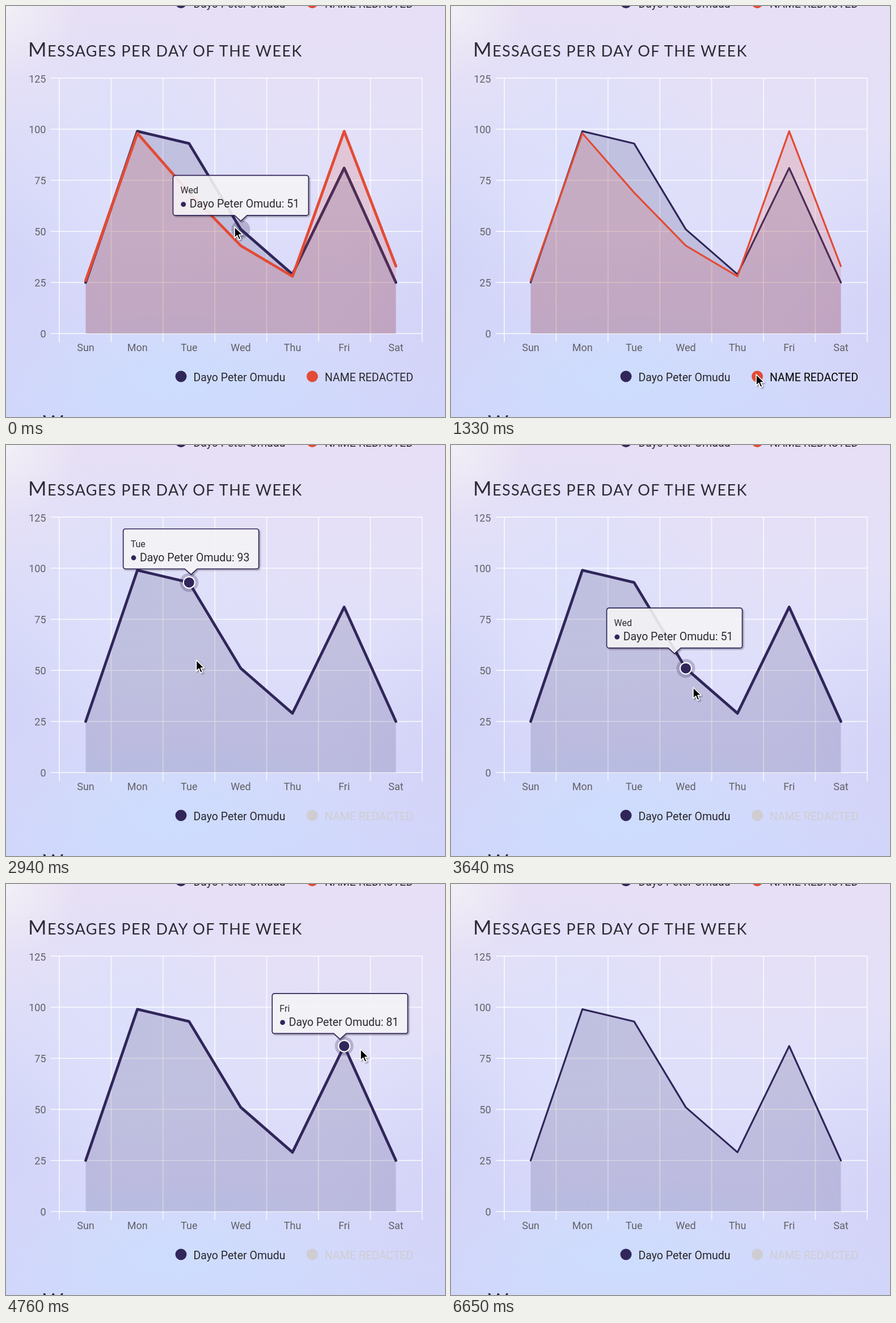
An HTML page that plays this animation: 774 by 724 pixels, repeating every 6720 ms.

```html
<!DOCTYPE html>
<html lang="en">
<head>
<meta charset="utf-8">
<title>Messages per day of the week</title>
<style>
  html, body { margin: 0; width: 100%; height: 100%; overflow: hidden; }
  body {
    background:
      radial-gradient(circle at 0 0, rgba(243,241,246,.9), rgba(243,241,246,0) 130px),
      radial-gradient(ellipse 330px 150px at 300px 660px, rgba(205,221,253,.95), rgba(205,221,253,0)),
      radial-gradient(ellipse 260px 260px at 220px 260px, rgba(218,223,252,.8), rgba(218,223,252,0)),
      radial-gradient(ellipse 210px 330px at 0 470px, rgba(209,211,248,.9), rgba(209,211,248,0)),
      radial-gradient(ellipse 200px 300px at 774px 560px, rgba(211,210,247,.9), rgba(211,210,247,0)),
      linear-gradient(#e7dff5, #e4e0f7 25%, #dfdffa 50%, #d8d9fa 75%, #d0d8fb);
  }
  svg { display: block; width: 774px; height: 724px; font-family: Roboto, Arial, sans-serif; }
  .title { font: 27px Lato, "Open Sans", sans-serif; letter-spacing: 1.4px; fill: #2d2a35; }
  .title .cap { font-size: 35px; }
  .axis { font-size: 18px; fill: #626068; }
  .legend { font-size: 19.5px; fill: #29272f; }
  .grid { stroke: #fff; stroke-opacity: .68; stroke-width: 2; fill: none; }
  .line { fill: none; stroke-linejoin: round; stroke-linecap: round; }
  .tip text { fill: #2b2a31; }
</style>
</head>
<body>
<svg id="stage" viewBox="0 0 774 724">
  <defs>
    <filter id="shadow" x="-10%" y="-20%" width="125%" height="150%">
      <feDropShadow dx="2" dy="2" stdDeviation="1.3" flood-color="#000" flood-opacity=".32"/>
    </filter>
  </defs>
</svg>
<script>
const LOOP = 6720, STEP = 70;
const NAVY = '#30265a', RED = '#e24b35', GREY = '#cfcdd2';
const NAME = 'Dayo Peter Omudu', OTHER = 'NAME REDACTED';
const DAYS = ['Sun', 'Mon', 'Tue', 'Wed', 'Thu', 'Fri', 'Sat'];
const FIRST = [25, 99, 93, 51, 29, 81, 25];
const SECOND = [26, 98, 69, 43, 28, 99, 33];
const CLICK = 1470;

// Pointer: time, x, y
const PATH = [
  [0, 403, 389], [210, 410, 404], [630, 490, 560], [980, 538, 649], [1680, 538, 649],
  [2310, 455, 484], [2680, 368, 410], [3080, 318, 362], [3360, 335, 388],
  [3520, 369, 408], [3640, 427, 427], [3850, 480, 440], [4250, 505, 425],
  [4560, 550, 370], [4760, 625, 291], [5150, 622, 300], [5290, 550, 440],
  [5390, 392, 681], [5460, 352, 750]
];

// Each visit: point hovers (time, day), moment the pointer leaves, moment the tooltip hides
const VISITS = [
  { hovers: [[-1000, 3]], leave: 0, hide: 490 },
  { hovers: [[2380, 3], [2680, 2], [3520, 3], [3750, 4], [4562, 5], [5294, 4]], leave: 5348, hide: 5850 }
];
const FADE = 210;

const stage = document.getElementById('stage');
const px = i => 140.5 + i * 91.15;
const py = v => 577 - v * 3.6;

function add(tag, attrs, parent = stage, text) {
  const el = document.createElementNS('http://www.w3.org/2000/svg', tag);
  set(el, attrs);
  if (text !== undefined) el.textContent = text;
  parent.append(el);
  return el;
}

function set(el, attrs) {
  for (const key in attrs) el.setAttribute(key, attrs[key]);
}

function heading(x, y, cap, rest) {
  const el = add('text', { x, y, class: 'title' });
  add('tspan', { class: 'cap' }, el, cap);
  add('tspan', {}, el, rest);
}

function legend(dy) {
  const item = (x, color, label) => ({
    dot: add('circle', { cx: x, cy: 652.5 + dy, r: 10, fill: color }),
    label: add('text', { x: x + 22, y: 661 + dy, class: 'legend' }, stage, label)
  });
  item(308.5, NAVY, NAME);
  return item(540, RED, OTHER);
}

function series(values, color) {
  const group = add('g', {});
  const points = values.map((v, i) => `${px(i)},${py(v)}`).join(' ');
  add('polygon', { points: `${px(0)},577 ${points} ${px(6)},577`, fill: color, 'fill-opacity': .17 }, group);
  const line = add('polyline', { points, stroke: color, class: 'line' }, group);
  return { group, line };
}

legend(-658.5);
heading(39, 89, 'M', 'ESSAGES PER DAY OF THE WEEK');
heading(65, 746, 'W', 'ORDS');

for (let i = 0; i <= 5; i++) {
  const y = i === 5 ? 127 : Math.round(577 - i * 89.9);
  add('path', { d: `M79 ${y}H734`, class: 'grid' });
  add('text', { x: 70.5, y: y + (i === 5 ? 8 : 7), class: 'axis', 'text-anchor': 'end' }, stage, i * 25);
}
for (let i = 0; i <= 7; i++) add('path', { d: `M${94 + i * 91.4} 127V592`, class: 'grid' });
DAYS.forEach((day, i) =>
  add('text', { x: px(i), y: 608, class: 'axis', 'text-anchor': 'middle' }, stage, day));

const first = series(FIRST, NAVY);
const second = series(SECOND, RED);
const halo = add('circle', { r: 16.5, fill: NAVY, 'fill-opacity': .25 });
const marker = add('circle', { r: 10, fill: NAVY, stroke: '#fff', 'stroke-width': 2 });
const toggle = legend(0);

const tip = add('g', { class: 'tip' });
add('path', {
  d: 'M4 0H235a4 4 0 0 1 4 4V66.5a4 4 0 0 1-4 4H130.5l-11 10l-11-10H4a4 4 0 0 1-4-4V4a4 4 0 0 1 4-4Z',
  fill: '#f8f7fa', 'fill-opacity': .87, stroke: NAVY, 'stroke-width': 1.7, filter: 'url(#shadow)'
}, tip);
const tipDay = add('text', { x: 13, y: 32, 'font-size': 16 }, tip);
add('circle', { cx: 18.3, cy: 51, r: 4.4, fill: NAVY }, tip);
const tipText = add('text', { x: 29.3, y: 57, 'font-size': 19.5 }, tip);

const pointer = add('g', {});
add('path', {
  d: 'M0 0V19.5L4.6 15.3L7.6 22.6L11 21.2L8 14.1L14 13.8Z',
  fill: '#000', stroke: '#fff', 'stroke-width': 1.6, 'stroke-linejoin': 'round', filter: 'url(#shadow)'
}, pointer);

function pointerAt(t) {
  const i = PATH.findIndex(p => p[0] > t);
  if (i < 0) return [0, 900];
  const [t0, x0, y0] = PATH[i - 1], [t1, x1, y1] = PATH[i];
  const k = (t - t0) / (t1 - t0);
  return [x0 + (x1 - x0) * k, y0 + (y1 - y0) * k];
}

// The tooltip chases each hovered point, faster vertically than horizontally.
function tipAt(hovers, t) {
  let x, y, day;
  hovers.forEach(([start, d], i) => {
    if (t < start) return;
    const next = hovers[i + 1];
    const n = (Math.min(t, next ? next[0] : t) - start) / 32;
    const tx = px(d) - 119.5, ty = py(FIRST[d]) - 95;
    x = i ? tx + (x - tx) * (2 / 3) ** n : tx;
    y = i ? ty + (y - ty) * .5 ** n : ty;
    day = d;
  });
  return { x, y, day };
}

function show(el, on) {
  el.setAttribute('visibility', on ? 'visible' : 'hidden');
}

function draw(t) {
  const off = t >= CLICK;
  show(second.group, !off);
  toggle.dot.setAttribute('fill', off ? GREY : RED);
  toggle.label.style.fill = off ? GREY : t >= 910 ? '#000' : '';

  const visit = VISITS.find(v => t >= v.hovers[0][0] && t < v.hide + FADE);
  const active = visit && t < visit.hide;
  for (const s of [first, second]) s.line.setAttribute('stroke-width', active ? 4.8 : 3.2);
  show(tip, visit);
  show(halo, active);
  show(marker, active && t < visit.leave);
  if (visit) {
    const { x, y, day } = tipAt(visit.hovers, t);
    const spot = { cx: px(day), cy: py(FIRST[day]) };
    set(halo, spot);
    set(marker, spot);
    set(tip, {
      transform: `translate(${x} ${y})`,
      opacity: Math.min(1, (visit.hide + FADE - t) / FADE)
    });
    tipDay.textContent = DAYS[day];
    tipText.textContent = `${NAME}: ${FIRST[day]}`;
  }
  pointer.setAttribute('transform', `translate(${pointerAt(t)})`);
}

const origin = performance.now();
function tick() {
  const t = (performance.now() - origin) % LOOP;
  draw(Math.floor(t / STEP) * STEP);
  requestAnimationFrame(tick);
}
tick();
</script>
</body>
</html>
```
